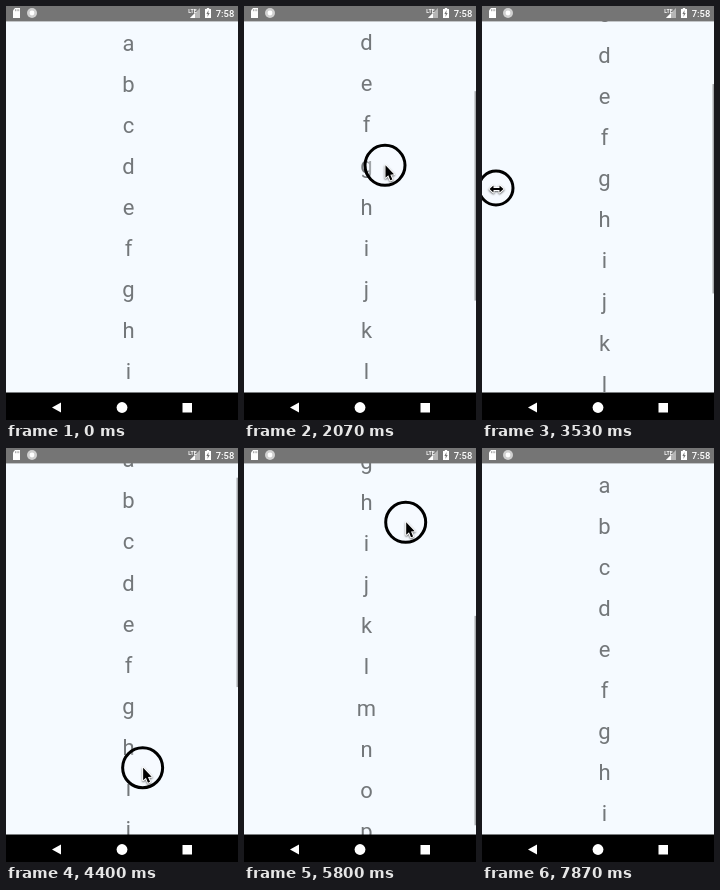
Recreate the animation shown at these times as an HTML page with a canvas. Size 232 by 414 pixels, loop 8070 ms.

```html
<!DOCTYPE html>
<html lang="en">
<head>
<meta charset="utf-8">
<title>Scrolling list</title>
<style>
html, body { margin: 0; width: 100%; height: 100%; overflow: hidden; background: #f5faff; }
canvas { display: block; }
</style>
</head>
<body>
<canvas id="stage" width="232" height="414"></canvas>
<script>
const c = document.getElementById('stage').getContext('2d');
const LOOP = 8070, STEP = 1000 / 15, STEPS = 121;
const TOP = 15.4, BOTTOM = 386.5, VIEW = BOTTOM - TOP;
const LETTERS = 'abcdefghijklmnop', PITCH = 41.1;
const HEIGHT = LETTERS.length * PITCH, MAX = HEIGHT - VIEW;
const SLOP = 13, FRICTION = 0.935;

// Pointer stops: step, x, y
const stops = [
  [2, 12, 200], [9, 133, 146], [14, 122, 157], [20, 141, 296], [22, 141, 296],
  [33, 141, 129], [36, 141, 129], [41, 95, 75], [48, 32, 293], [53, 14, 182],
  [61, 130, 345], [63, 130, 345], [77, 161, 227], [86, 161, 58], [96, 168, 221],
  [99, 170, 310], [102, 170, 310], [109, -12, 240]
];

const clamp = (v, lo, hi) => Math.min(hi, Math.max(lo, v));
const shown = n => n >= 2 && n < 109;
const pressed = n => (n >= 22 && n < 88) || (n >= 96 && n < 99);

function pointer(n) {
  const i = clamp(stops.findIndex(s => s[0] > n), 1, stops.length - 1);
  const [n0, x0, y0] = stops[i - 1], [n1, x1, y1] = stops[i];
  const p = (n - n0) / (n1 - n0);
  return [x0 + (x1 - x0) * p, y0 + (y1 - y0) * p];
}

// Scroll offset at every step: dragging past the slop moves the list, letting go flings it
const offsets = [];
let offset = 0, speed = 0, slop = SLOP;
for (let n = 0; n < STEPS; n++) {
  if (!pressed(n)) {
    offset -= speed;
    speed *= FRICTION;
  } else if (!pressed(n - 1)) {
    slop = SLOP;
    speed = 0;
  } else {
    speed = pointer(n)[1] - pointer(n - 1)[1];
    const lost = Math.min(slop, Math.abs(speed));
    slop -= lost;
    offset -= speed - Math.sign(speed) * lost;
  }
  offset = clamp(offset, 0, MAX);
  offsets.push(offset);
}

function rect(color, x, y, w, h) {
  c.fillStyle = color;
  c.fillRect(x, y, w, h);
}

function poly(color, points, x = 0, y = 0) {
  c.beginPath();
  points.forEach(p => c.lineTo(x + p[0], y + p[1]));
  c.closePath();
  c.fillStyle = color;
  c.fill();
}

function disc(color, x, y, r) {
  c.beginPath();
  c.arc(x, y, r, 0, 7);
  c.fillStyle = color;
  c.fill();
}

function text(s, x, y, size, color, weight = 400) {
  c.font = `${weight} ${size}px Roboto, sans-serif`;
  c.textAlign = 'center';
  c.fillStyle = color;
  c.fillText(s, x, y);
}

function drawList(n) {
  const top = offsets[n];
  rect('#f5faff', 0, 0, 232, 414);
  [...LETTERS].forEach((s, i) => text(s, 122.5, 44.5 + i * PITCH - top, 22, '#73777a'));
  if (n < 23) return;
  c.globalAlpha = clamp((118 - n) / 4, 0, 1);
  rect('#a5a8ab', 230.5, TOP + top * VIEW / HEIGHT, 1.5, VIEW * VIEW / HEIGHT);
  c.globalAlpha = 1;
}

function drawBars() {
  rect('#757575', 0, 0, 232, TOP);
  poly('#fff', [[9, 2], [14, 2], [14, 12], [7, 12], [7, 4.5]]);
  [9, 10.7, 12.4].forEach(x => rect('#999', x, 3.2, 0.8, 2));
  disc('#d0d0d0', 26, 7, 5);
  disc('#fff', 26, 7, 2.4);
  poly('#b5b5b5', [[194, 2], [194, 12], [184, 12]]);
  poly('#fff', [[189, 7], [189, 12], [184, 12]]);
  text('LTE', 186.5, 6.5, 5.2, '#fff', 700);
  rect('#fff', 199, 3, 6, 9);
  rect('#fff', 200.8, 2, 2.4, 1);
  poly('#757575', [[202.6, 4], [200.4, 8], [201.8, 8], [201.4, 11], [203.7, 7], [202.3, 7]]);
  text('7:58', 219, 11, 9.4, '#fff', 500);

  rect('#000', 0, BOTTOM, 232, 28);
  poly('#fff', [[46, 401.5], [55, 396.5], [55, 406.5]]);
  disc('#fff', 116, 401.5, 5.4);
  rect('#fff', 176.5, 397, 9.5, 9.5);
}

function outlined(points, x, y) {
  c.lineJoin = 'round';
  c.lineWidth = 2;
  c.strokeStyle = '#fff';
  c.shadowColor = 'rgba(0,0,0,.5)';
  c.shadowBlur = 2;
  c.shadowOffsetY = 1;
  poly('#000', points, x, y);
  c.stroke();
  c.shadowColor = 'transparent';
  c.fill();
}

function drawPointer(x, y, ring) {
  const edge = x < 20;
  if (ring) {
    disc('rgba(245,250,255,.35)', x, y, 18);
    c.beginPath();
    c.arc(x, y, edge ? 17 : 20, 0, 7);
    c.lineWidth = 3;
    c.strokeStyle = '#000';
    c.stroke();
  }
  if (edge) {
    const half = [[-7, 0], [-3, -3.5], [-3, -1], [3, -1], [3, -3.5], [7, 0]];
    outlined([...half, ...half.slice(1, 5).reverse().map(p => [p[0], -p[1]])], x + 0.5, y + 1);
  } else {
    outlined([[0.5, 0], [0.5, 12.5], [3.3, 10], [5.3, 15], [7.4, 14.1], [5.3, 9.3], [9, 9]], x, y);
  }
}

function frame(now) {
  const n = Math.floor((now % LOOP + 5) / STEP) % STEPS;
  drawList(n);
  drawBars();
  if (shown(n)) drawPointer(...pointer(n), pressed(n));
  requestAnimationFrame(() => frame(performance.now() - start));
}

const start = performance.now();
frame(0);
</script>
</body>
</html>
```
